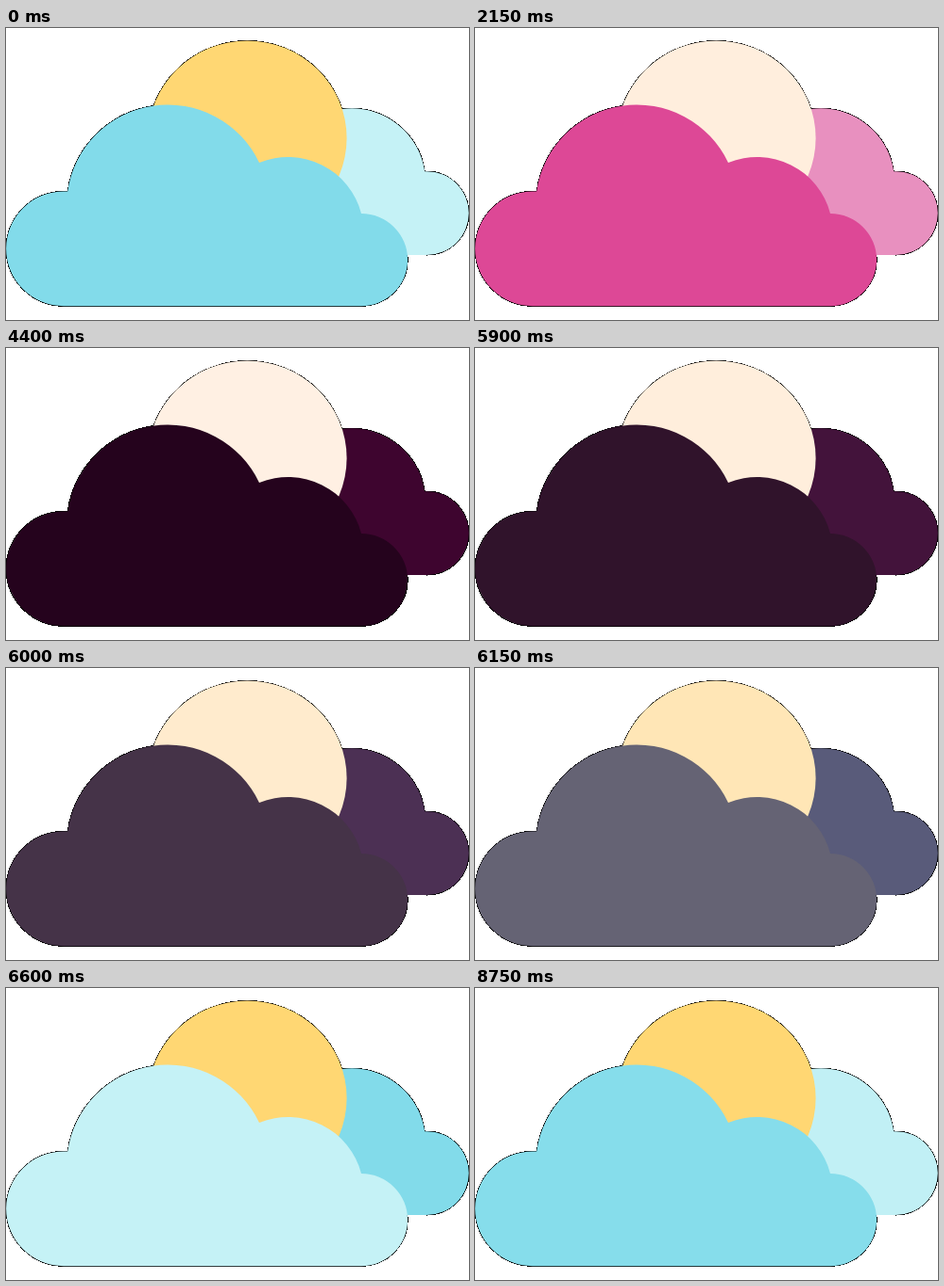
Recreate the animation shown at these times as an HTML page. Size 490x310 px, loop 8.8 s.

```html
<!DOCTYPE html>
<html lang="en">
<head>
<meta charset="utf-8">
<title>Clouds and sun</title>
<style>
  html, body { margin: 0; width: 100%; height: 100%; overflow: hidden; background: #fff; }
  svg { display: block; width: 490px; height: 310px; }
  #edges { fill: none; stroke: #000; stroke-width: 1.1; shape-rendering: crispEdges; }
</style>
</head>
<body>
<svg viewBox="0 0 490 310">
  <defs>
    <!-- Left open so that the flat bottom gets no rim -->
    <path id="backShape" d="M300 241V163H288A78 78 0 0 1 443.2 152.2H445.4A44.4 44.4 0 0 1 445.4 241"/>
    <ellipse id="sunShape" cx="255.4" cy="116.9" rx="105.2" ry="103.4"/>
    <path id="frontShape" d="M61 295.2A60.9 60.9 0 0 1 61 173.4H65.2A107 107 0 0 1 268 143A80 80 0 0 1 376 197A49.1 49.1 0 0 1 376 295.2Z"/>
  </defs>
  <!-- Dark rim: the fills on top leave it visible only against the background -->
  <g id="edges">
    <use href="#backShape"/><use href="#sunShape"/><use href="#frontShape"/>
  </g>
  <use id="back" href="#backShape"/>
  <use id="sun" href="#sunShape"/>
  <use id="front" href="#frontShape"/>
</svg>
<script>
const LOOP = 8800, STEP = 50;
const parts = ['front', 'sun', 'back'].map(id => document.getElementById(id));

// Colours of front cloud, sun and back cloud
const skies = [
  [0x82dbea, 0xffd773, 0xc5f2f6],
  [0xdd4896, 0xffeedd, 0xe890bf],
  [0x25031d, 0xfff0e3, 0x3e052f],
  [0xc5f2f6, 0xffd773, 0x82dbea]
];
const fades = [
  { start: 1500, steps: 14 },
  { start: 3700, steps: 15 },
  { start: 5900, steps: 15 },
  { start: 8100, steps: 15 }
];

function mix(a, b, p) {
  const channels = [16, 8, 0].map(shift => {
    const from = a >> shift & 255, to = b >> shift & 255;
    return Math.round(from + (to - from) * p);
  });
  return `rgb(${channels})`;
}

function draw(ms) {
  const t = ms % LOOP;
  let i = 0, p = 0;
  fades.forEach((fade, n) => {
    if (t < fade.start) return;
    i = n;
    p = Math.min(1, (Math.floor((t - fade.start) / STEP) + 1) / fade.steps);
  });
  const from = skies[i], to = skies[(i + 1) % skies.length];
  parts.forEach((part, n) => part.setAttribute('fill', mix(from[n], to[n], p)));
}

const begin = performance.now();
function tick() {
  draw(performance.now() - begin);
  requestAnimationFrame(tick);
}
tick();
</script>
</body>
</html>
```
